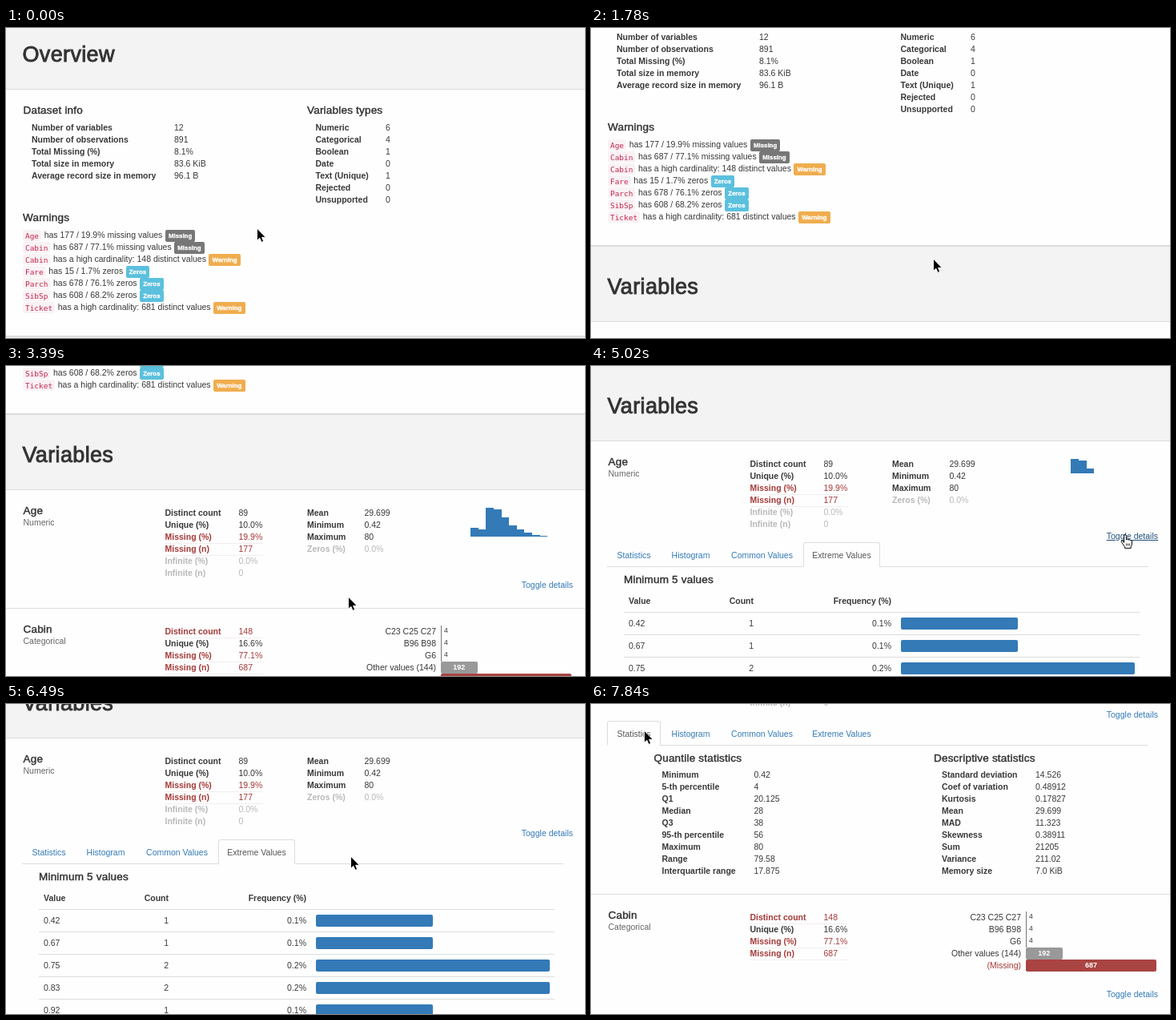
An HTML page that plays this animation: 723x387 px, repeating every 8000 ms.

```html
<!DOCTYPE html>
<html lang="en">
<head>
<meta charset="utf-8">
<title>Data profile report</title>
<style>
html, body { margin: 0; width: 100%; height: 100%; overflow: hidden; background: #fefefe; }
#stage { position: relative; width: 723px; height: 387px; overflow: hidden; background: #fefefe;
  font: 10.5px/15px "Liberation Sans", Arial, sans-serif; color: #383838; }
#page, #age, #cabin, #extreme, #stats { position: absolute; left: 0; top: 0; width: 723px; }
#page { will-change: transform; }
.t, .r { position: absolute; white-space: pre; }
.b { font-weight: bold; }
.h1 { font-size: 27px; line-height: 30px; letter-spacing: .35px; color: #333; -webkit-text-stroke: .9px #333; }
.h4 { font-size: 13.5px; letter-spacing: .2px; color: #333; -webkit-text-stroke: .45px #333; }
.sub { color: #666; }
.alert { color: #a53a38; }
.ignore { color: #b8b8b8; }
.link { color: #337ab7; }
.link.over { color: #23527c; text-decoration: underline; }
.num { font-size: 8.5px; }
.white { color: #fff; font-size: 9px; font-weight: bold; }
code { font: 9.45px "DejaVu Sans Mono", monospace; color: #c7254e; background: #f9f2f4;
  padding: 1.5px 3px; margin-right: .7px; border-radius: 3px; }
.tag { font-size: 7.875px; font-weight: bold; color: #fff; padding: 2.6px 4.2px; margin-left: .5px; border-radius: 2px;
  -webkit-text-stroke: .3px #fff; }
.tab { position: absolute; top: 606px; height: 31px; line-height: 30px; box-sizing: border-box;
  border: 1px solid transparent; border-radius: 3px 3px 0 0; text-align: center; color: #337ab7; white-space: pre; }
.tab.over { background: #eee; border-color: #eee #eee #ddd; }
.tab.on { background: #fefefe; border-color: #ddd #ddd #fefefe; color: #555; }
#cursor { position: absolute; left: 0; top: 0; overflow: visible; }
</style>
</head>
<body>
<div id="stage">
  <div id="page">
    <div id="age"></div>
    <div id="extreme"></div>
    <div id="stats"></div>
    <div id="cabin"></div>
  </div>
  <svg id="cursor" width="20" height="20">
    <path id="arrow" d="M-.6 -1V14.4L2.8 11.3L5 16.4L7.7 15.2L5.6 10.3H10.4Z" fill="#000" stroke="#fff" stroke-width="1"/>
    <g id="hand" fill="#fff" stroke="#000" stroke-width="1" stroke-linejoin="round">
      <path d="M-1.4 8V1.2Q-1.4 -.4 0 -.4T1.4 1.2V6Q1.6 4.8 2.8 5T4 6.4Q4.2 5.4 5.3 5.6T6.4 7Q6.7 6.2 7.6 6.5T8.5 8V11Q8.5 13 7.2 14.2V16.4H-.4V14.6Q-2 13 -3 11L-4.7 8.6Q-5.2 7.4 -4 7T-2.4 8L-1.4 9.4Z"/>
      <path d="M1.6 10.5V13.5M3.6 10.5V13.5M5.6 10.5V13.5" stroke-width=".8"/>
    </g>
  </svg>
</div>
<script>
const $ = id => document.getElementById(id);
const BLUE = '#337ab7', RED = '#a94442';

function add(parent, cls, css, html = '') {
  const el = document.createElement('div');
  el.className = cls;
  el.style.cssText = css;
  el.innerHTML = html;
  $(parent).append(el);
  return el;
}

// Text is placed by its vertical middle; a right-aligned x is the right end.
function text(parent, x, y, html, cls = '', align = 'left') {
  const half = cls === 'h1' ? 15 : 7.5;
  const side = align === 'right' ? `right:${723 - x}px` : `left:${x}px`;
  const shift = align === 'center' ? ';transform:translateX(-50%)' : '';
  return add(parent, 't ' + cls, `${side};top:${y - half}px${shift}`, html);
}
const box = (parent, x, y, w, h, color, radius = 0) =>
  add(parent, 'r', `left:${x}px;top:${y}px;width:${w}px;height:${h}px;background:${color};border-radius:${radius}px`);

// Rows are "label|value|class", separated by semicolons.
function table(parent, x, valueX, y, rows) {
  rows.split(';').forEach((row, i) => {
    const [label, value, cls = ''] = row.split('|');
    const mid = y + 15 * i;
    text(parent, x, mid, label, 'b ' + cls);
    text(parent, valueX, mid, value, cls);
    if (cls === 'alert') box(parent, x, mid + 7.5, 122, 1, '#f2eeee');
  });
}

// Overview
box('page', 0, 0, 723, 76, '#f3f3f3');
box('page', 0, 76, 723, 1, '#ddd');
text('page', 20.5, 33, 'Overview', 'h1');
text('page', 21.5, 102.5, 'Dataset info', 'h4');
table('page', 32, 210, 124.5, 'Number of variables|12;Number of observations|891;Total Missing (%)|8.1%;' +
  'Total size in memory|83.6 KiB;Average record size in memory|96.1 B');
text('page', 376, 102.5, 'Variables types', 'h4');
table('page', 386.5, 474, 124.5, 'Numeric|6;Categorical|4;Boolean|1;Date|0;Text (Unique)|1;Rejected|0;Unsupported|0');
text('page', 21, 236.5, 'Warnings', 'h4');

const tagColor = { Missing: '#777', Warning: '#f0ad4e', Zeros: '#5bc0de' };
[
  'Age|has 177 / 19.9% missing values|Missing',
  'Cabin|has 687 / 77.1% missing values|Missing',
  'Cabin|has a high cardinality: 148 distinct values|Warning',
  'Fare|has 15 / 1.7% zeros|Zeros',
  'Parch|has 678 / 76.1% zeros|Zeros',
  'SibSp|has 608 / 68.2% zeros|Zeros',
  'Ticket|has a high cardinality: 681 distinct values|Warning'
].forEach((row, i) => {
  const [name, note, tag] = row.split('|');
  text('page', 21, 258.5 + 15 * i,
    `<code>${name}</code> ${note} <span class="tag" style="background:${tagColor[tag]}">${tag}</span>`);
});

// Variables
box('page', 0, 385, 723, 94, '#f3f3f3');
box('page', 0, 384, 723, 2, '#dcdcdc');
box('page', 0, 479, 723, 1, '#ddd');
text('page', 20.5, 436, 'Variables', 'h1');

text('page', 21.5, 505.5, 'Age', 'h4');
text('page', 21.5, 520.5, 'Numeric', 'sub');
table('page', 198.5, 290.5, 508.5, 'Distinct count|89;Unique (%)|10.0%;Missing (%)|19.9%|alert;' +
  'Missing (n)|177|alert;Infinite (%)|0.0%|ignore;Infinite (n)|0|ignore');
table('page', 376, 447.5, 508.5, 'Mean|29.699;Minimum|0.42;Maximum|80;Zeros (%)|0.0%|ignore');
const toggle = text('page', 708, 598.5, 'Toggle details', 'link', 'right');

const histogram = add('page', 'r', 'left:580px;top:502px;width:97px;height:36px;overflow:hidden');
histogram.id = 'histogram';
[54, 46, 177, 169, 118, 70, 45, 24, 9, 2].forEach((n, i) => {
  const h = Math.max(.6, n / 177 * 36);
  box('histogram', 9.6 * i, 36 - h, 9.8, h, BLUE);
});

// Details of Age
const tabs = add('page', 'r', 'left:0;top:0');
tabs.id = 'tabs';
box('tabs', 20, 636, 676, 1, '#ddd');
const tabEls = [['Statistics', 20, 67], ['Histogram', 88, 73], ['Common Values', 163, 101], ['Extreme Values', 265, 96]]
  .map(([name, x, w]) => add('tabs', 'tab', `left:${x}px;width:${w}px`, name));

function extremes(y, title, rows) {
  text('extreme', 41, y, title, 'h4');
  text('extreme', 47, y + 27, 'Value', 'b');
  text('extreme', 203, y + 27, 'Count', 'b', 'right');
  text('extreme', 375, y + 27, 'Frequency (%)', 'b', 'right');
  rows.forEach(([value, count], i) => {
    const mid = y + 55 + 28 * i;
    box('extreme', 41, mid - 14.5, 644, 1, '#ddd');
    text('extreme', 47, mid, value);
    text('extreme', 203, mid, count, '', 'right');
    text('extreme', 375, mid, `0.${count}%`, '', 'right');
    box('extreme', 387, mid - 7.5, 146 * count, 15, BLUE, 2);
  });
}
extremes(652.5, 'Minimum 5 values', [['0.42', 1], ['0.67', 1], ['0.75', 2], ['0.83', 2], ['0.92', 1]]);
extremes(863.5, 'Maximum 5 values', [['70.0', 2], ['70.5', 1], ['71.0', 2], ['74.0', 1], ['80.0', 1]]);

text('stats', 78.5, 652.5, 'Quantile statistics', 'h4');
table('stats', 88.5, 203.5, 673.5, 'Minimum|0.42;5-th percentile|4;Q1|20.125;Median|28;Q3|38;' +
  '95-th percentile|56;Maximum|80;Range|79.58;Interquartile range|17.875');
text('stats', 428, 652.5, 'Descriptive statistics', 'h4');
table('stats', 438, 555, 673.5, 'Standard deviation|14.526;Coef of variation|0.48912;Kurtosis|0.17827;Mean|29.699;' +
  'MAD|11.323;Skewness|0.38911;Sum|21205;Variance|211.02;Memory size|7.0 KiB');

// Cabin
box('cabin', 0, 627, 723, 1, '#ddd');
text('cabin', 21.5, 653.5, 'Cabin', 'h4');
text('cabin', 21.5, 668.5, 'Categorical', 'sub');
table('cabin', 198.5, 290.5, 656.5, 'Distinct count|148|alert;Unique (%)|16.6%;Missing (%)|77.1%|alert;Missing (n)|687|alert');
[['C23 C25 C27', 4], ['B96 B98', 4], ['G6', 4], ['Other values (144)', 192], ['(Missing)', 687]].forEach(([name, n], i) => {
  const mid = 656.5 + 15 * i, w = Math.max(1, n / 687 * 163);
  text('cabin', 537, mid, name, n === 687 ? 'alert' : '', 'right');
  box('cabin', 543, mid - 7.5, w, 14.5, n === 687 ? RED : n === 4 ? '#777' : '#999', n === 4 ? 0 : 2);
  if (n === 4) text('cabin', 547, mid - 1, n, 'num');
  else text('cabin', 543 + w / 2, mid, n, 'white', 'center');
});
text('cabin', 708, 752.5, 'Toggle details', 'link', 'right');

// Motion: [time, scroll] and [time, x, y], each held until the next step.
const scrolls = [
  [0, 0], [450, 3], [750, 15], [900, 58], [1040, 86], [1190, 113],
  [2070, 117], [2220, 222], [2510, 285], [2660, 303],
  [3100, 306], [3240, 314], [3390, 325], [3540, 386],
  [5760, 392], [5900, 404], [6040, 418], [6190, 430], [6490, 437],
  [6640, 470], [6790, 535], [6940, 585]
];
const moves = [
  [0, 314, 251], [1340, 335, 258], [1490, 375, 273], [1630, 412, 285], [1780, 428, 289],
  [3840, 440, 286], [3990, 482, 274], [4130, 540, 256], [4280, 596, 237], [4430, 638, 221], [4570, 660, 213], [4720, 667, 211],
  [5170, 640, 210], [5320, 565, 204], [5460, 478, 196], [5610, 431, 191],
  [7090, 350, 153], [7240, 180, 80], [7390, 75, 37], [7540, 67, 34]
];
const OPEN = 5020, GONE = 5170, STATS = 7840, LOOP = 8000;
const at = (steps, t) => steps.findLast(s => s[0] <= t);
const show = (el, on) => { el.style.display = on ? '' : 'none'; };

function draw(t) {
  const scroll = at(scrolls, t)[1];
  const [, x, y] = at(moves, t);
  const open = t >= OPEN, stats = t >= STATS;
  const onToggle = x > 642 && x < 709 && Math.abs(y + scroll - 598.5) < 8;
  const onTab = open && !stats && x < 87 && y + scroll > 606 && y + scroll < 637;
  const hand = onToggle || onTab;

  $('page').style.transform = `translateY(${-scroll}px)`;
  toggle.classList.toggle('over', onToggle);
  show(histogram, t < GONE);
  histogram.style.width = open ? '48px' : '97px';
  histogram.style.height = open ? '18px' : '36px';
  show(tabs, open);
  show($('extreme'), open && !stats);
  show($('stats'), stats);
  show($('cabin'), !open || stats);
  $('cabin').style.transform = `translateY(${stats ? 195 : 0}px)`;
  tabEls.forEach((el, i) => {
    el.classList.toggle('on', i === (stats ? 0 : 3));
    el.classList.toggle('over', i === 0 && onTab);
  });
  show($('arrow'), !hand);
  show($('hand'), hand);
  $('cursor').style.transform = `translate(${x}px,${y}px)`;
}

const start = performance.now();
function tick() {
  draw((performance.now() - start) % LOOP);
  requestAnimationFrame(tick);
}
tick();
</script>
</body>
</html>
```
